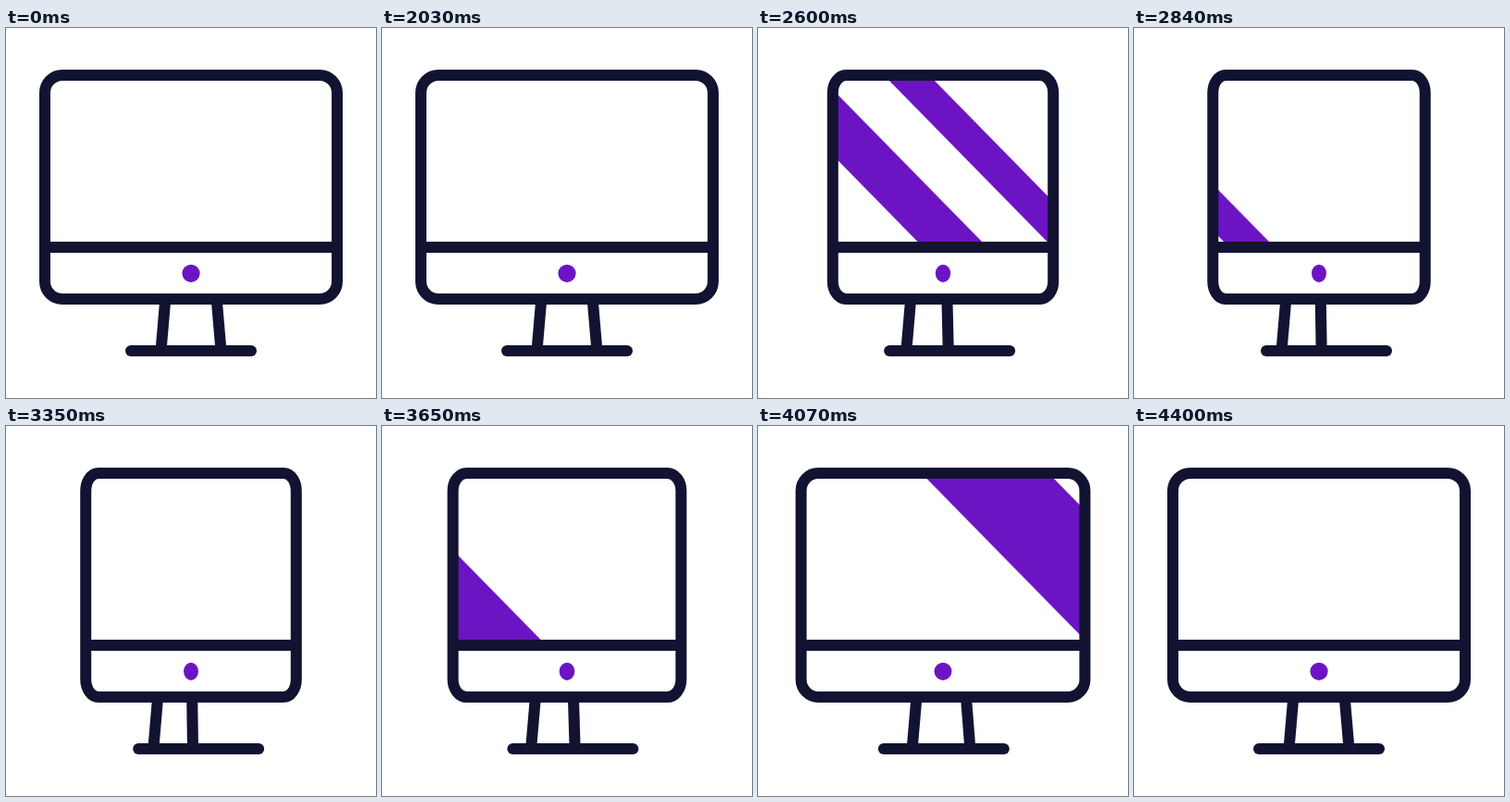
An HTML page for the animation above (4.43 s loop, 400x400 px).

```html
<!DOCTYPE html>
<html lang="en">
<head>
<meta charset="utf-8">
<title>Turning monitor</title>
<style>
  /* 0 = facing front, 1 = fully turned */
  @property --turn {
    syntax: "<number>";
    inherits: true;
    initial-value: 0;
  }

  html, body {
    margin: 0;
    width: 100%;
    height: 100%;
    overflow: hidden;
    background: #fff;
  }

  svg {
    display: block;
    width: 400px;
    height: 400px;
    animation: turn 4430ms infinite;
  }

  .line {
    fill: none;
    stroke: #121331;
    stroke-width: 12px;
  }

  .glare, .dot { fill: #6c14c4; }

  .case {
    x: calc(42px + 45px * var(--turn));
    y: 51px;
    width: calc(316px - 90px * var(--turn));
    height: 242px;
    rx: calc(19px - 5.4px * var(--turn));
    ry: 19px;
  }

  .bar {
    x: calc(42px + 45px * var(--turn));
    y: 231px;
    width: calc(316px - 90px * var(--turn));
    height: 12px;
    fill: #121331;
  }

  .dot { rx: calc(9.6px - 1.7px * var(--turn)); }

  .base {
    stroke-linecap: round;
    transform: translateX(calc(8.3px * var(--turn)));
  }

  .left { transform: translateX(calc(-8.3px * var(--turn))); }

  .right {
    transform-origin: 0 293px;
    transform: translateX(calc(-27px * var(--turn))) skewX(calc(-4.1deg * var(--turn)));
  }

  .out { animation: out 4430ms infinite; }
  .back { animation: back 4430ms infinite; }

  /* 2000 ms = 45.147%, 3200 ms = 72.235%, 4400 ms = 99.323% */
  @keyframes turn {
    0% { --turn: 0; }
    45.147% { --turn: 0; animation-timing-function: cubic-bezier(.4, 0, 0, 1); }
    72.235% { --turn: 1; animation-timing-function: cubic-bezier(.6, 0, .4, 1); }
    99.323%, 100% { --turn: 0; }
  }

  @keyframes out {
    0% { transform: translateX(516px); }
    45.147% { transform: translateX(516px); animation-timing-function: cubic-bezier(.333, 0, .667, 1); }
    72.235%, 100% { transform: translateX(-244px); }
  }

  @keyframes back {
    0% { transform: translateX(-330px); }
    72.235% { transform: translateX(-330px); animation-timing-function: cubic-bezier(.333, .2, .667, .8); }
    99.323%, 100% { transform: translateX(450px); }
  }
</style>
</head>
<body>
<svg viewBox="0 0 400 400">
  <clipPath id="screen"><rect class="case"/></clipPath>

  <g clip-path="url(#screen)">
    <g class="glare out">
      <path d="M50 51L232.4 237h-49L1 51z"/>
      <path d="M-69.5 51L112.9 237h-69.5L-139 51z"/>
    </g>
    <path class="glare back" d="M50 51L232.4 237h-137.5L-87.5 51z"/>
  </g>

  <path class="line left" d="M172.3 293L167.5 349"/>
  <path class="line right" d="M227.7 293L232.5 349"/>
  <path class="line base" d="M135 349H265"/>
  <rect class="bar"/>
  <rect class="line case"/>
  <ellipse class="dot" cx="200" cy="265.3" ry="9.6"/>
</svg>
</body>
</html>
```
